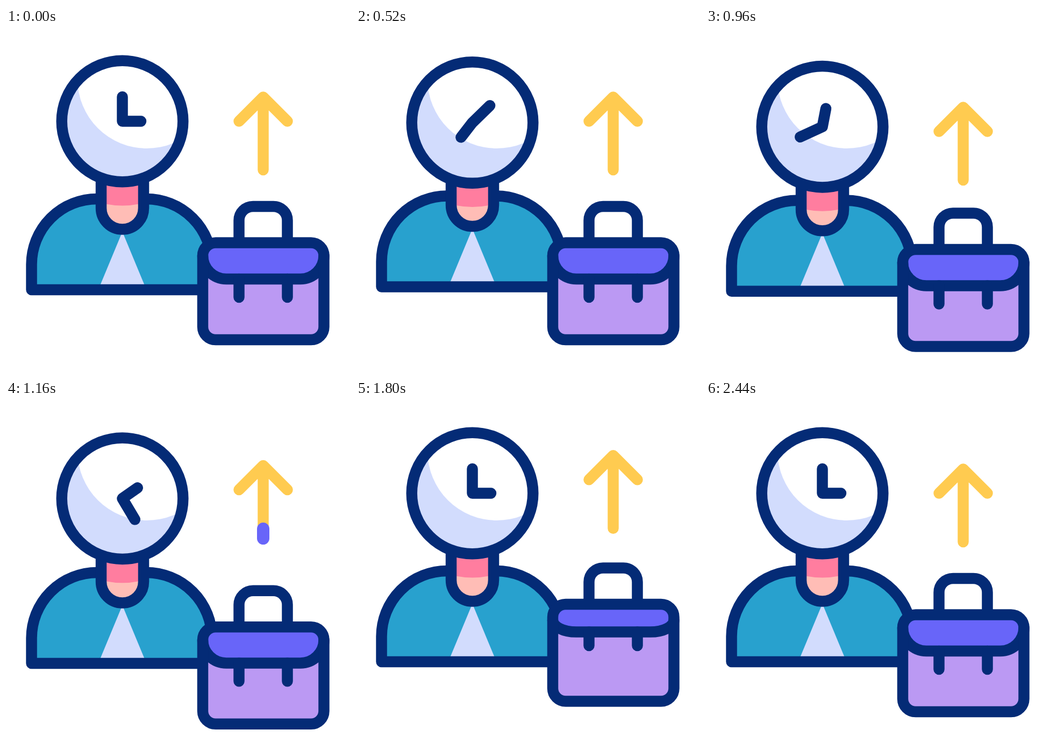
Write an HTML page that moves like this. It is 640 by 640 pixels and loops after 2960 ms.

```html
<!DOCTYPE html>
<html lang="en">
<head>
<meta charset="utf-8">
<title>Career clock</title>
<style>
  html, body { margin: 0; width: 100%; height: 100%; overflow: hidden; background: #fff; }
  svg { display: block; width: 100%; height: 100%; }
  .line { fill: none; stroke: #042b76; stroke-width: 20.5; stroke-linecap: round; stroke-linejoin: round; }
  .arrow { stroke: #ffcb50; }
  .trail { stroke: #6865f9; stroke-width: 23; }
</style>
</head>
<body>
<svg viewBox="0 0 640 640">
  <defs>
    <clipPath id="face"><circle id="faceClip" cx="216.5" cy="173.5" r="112"/></clipPath>
    <clipPath id="throat"><path d="M177 200V335a39.5 39.5 0 0 0 79 0V200z"/></clipPath>
  </defs>

  <g id="body">
    <path fill="#28a1ce" d="M47.500 487V440a122 122 0 0 1 122-122H261a122 122 0 0 1 122 122V487z"/>
    <path fill="#d2dcfd" d="M216.500 379L175 479H258z"/>
    <path class="line" d="M47.500 487V440a122 122 0 0 1 122-122H261a122 122 0 0 1 122 122V487z"/>
    <g clip-path="url(#throat)">
      <rect x="170" y="200" width="93" height="180" fill="#ffbdb6"/>
      <circle id="shade" cx="216.5" cy="173.5" r="157" fill="#ff7d9f"/>
    </g>
    <path class="line" d="M177 235V335a39.500 39.500 0 0 0 79 0V235"/>
  </g>

  <g clip-path="url(#face)">
    <rect x="90" width="260" height="360" fill="#d2dcfd"/>
    <circle cx="262" cy="95" r="129" fill="#fff"/>
  </g>
  <g id="head">
    <circle class="line" cx="216.5" cy="173.5" r="112.8"/>
    <path class="line" id="hands"/>
  </g>

  <g id="arrow">
    <path class="line arrow" d="M433.500 173.500L478.500 128.500L523.500 173.500M478.500 128.500V264"/>
    <path class="line trail" id="trail"/>
  </g>

  <g id="bag">
    <path class="line" d="M433.500 399V358a26 26 0 0 1 26-26H497.500a26 26 0 0 1 26 26V399"/>
    <rect x="366" y="399.5" width="225.500" height="180.500" rx="24" fill="#bb99f3"/>
    <path id="flap" fill="#6865f9"/>
    <path class="line" id="seam"/>
    <path class="line" id="straps"/>
    <rect class="line" x="366" y="399.5" width="225.500" height="180.500" rx="24"/>
  </g>
</svg>
<script>
const LOOP = 2960, STEP = 40;
const $ = id => document.getElementById(id);
const smooth = u => u * u * (3 - 2 * u);

// Eased value between [time, value] keys.
function track(keys, t) {
  if (t <= keys[0][0]) return keys[0][1];
  for (let i = 1; i < keys.length; i++) {
    const [t0, v0] = keys[i - 1], [t1, v1] = keys[i];
    if (t < t1) return v0 + (v1 - v0) * smooth((t - t0) / (t1 - t0));
  }
  return keys[keys.length - 1][1];
}

// Cubic bezier easing with flat ends.
function ease(x, x1, x2) {
  if (x <= 0) return 0;
  if (x >= 1) return 1;
  let lo = 0, hi = 1;
  for (let i = 0; i < 24; i++) {
    const s = (lo + hi) / 2, r = 1 - s;
    if (3 * s * r * r * x1 + 3 * s * s * r * x2 + s * s * s < x) lo = s; else hi = s;
  }
  return smooth(lo);
}

const KEYS = {
  body: [[0, 0], [280, 18], [600, -9.8], [1040, 4], [1400, 0]],
  head: [[0, 0], [410, 25], [672, -34], [1020, 14], [1400, 0]],
  bag: [[800, 0], [1120, 25], [1480, -38], [2133, 0]],
  lift: [[1130, 0], [1480, 1], [2400, 0]],
  arrow: [[720, 0], [995, 20], [1470, -75], [2010, 0]],
  trailEnd: [[1040, 0], [1565, 1]],
  trailStart: [[1240, 0], [1765, 1]]
};

const move = (id, y) => $(id).setAttribute('transform', `translate(0 ${y.toFixed(2)})`);
const path = (id, d) => $(id).setAttribute('d', d);

function tip(length, turns) {
  const a = turns * 2 * Math.PI;
  return `${(216.5 + length * Math.sin(a)).toFixed(2)} ${(173.5 - length * Math.cos(a)).toFixed(2)}`;
}

function draw(t) {
  const v = {};
  for (const name in KEYS) v[name] = track(KEYS[name], t);

  for (const id of ['body', 'head', 'bag', 'arrow']) move(id, v[id]);
  move('faceClip', v.head);
  move('shade', v.head - v.body);

  const p = ease((t - 160) / 1398, .129, .473);
  path('hands', `M${tip(45.5, 6 * p)}L216.500 173.500L${tip(34.5, .25 + p)}`);

  const from = 264 - 135.5 * v.trailStart, to = 264 - 135.5 * v.trailEnd;
  path('trail', from - to > .1 ? `M478.500 ${from}V${to}` : '');

  const side = 423.5 + 7.5 * v.lift, low = 467 - 22 * v.lift, ry = low - side;
  const curve = `A44 ${ry} 0 0 0 410 ${low}H547.500A44 ${ry} 0 0 0 591.500 ${side}`;
  path('seam', `M366 ${side}${curve}`);
  path('flap', `M366 ${side}${curve}V423.500a24 24 0 0 0 -24-24H390a24 24 0 0 0 -24 24z`);
  const end = 501 - 34 * v.lift;
  path('straps', `M433.500 ${low}V${end}M523.500 ${low}V${end}`);
}

const start = performance.now();
function tick() {
  const t = (performance.now() - start) % LOOP;
  draw(Math.floor(t / STEP) * STEP);
  requestAnimationFrame(tick);
}
tick();
</script>
</body>
</html>
```
